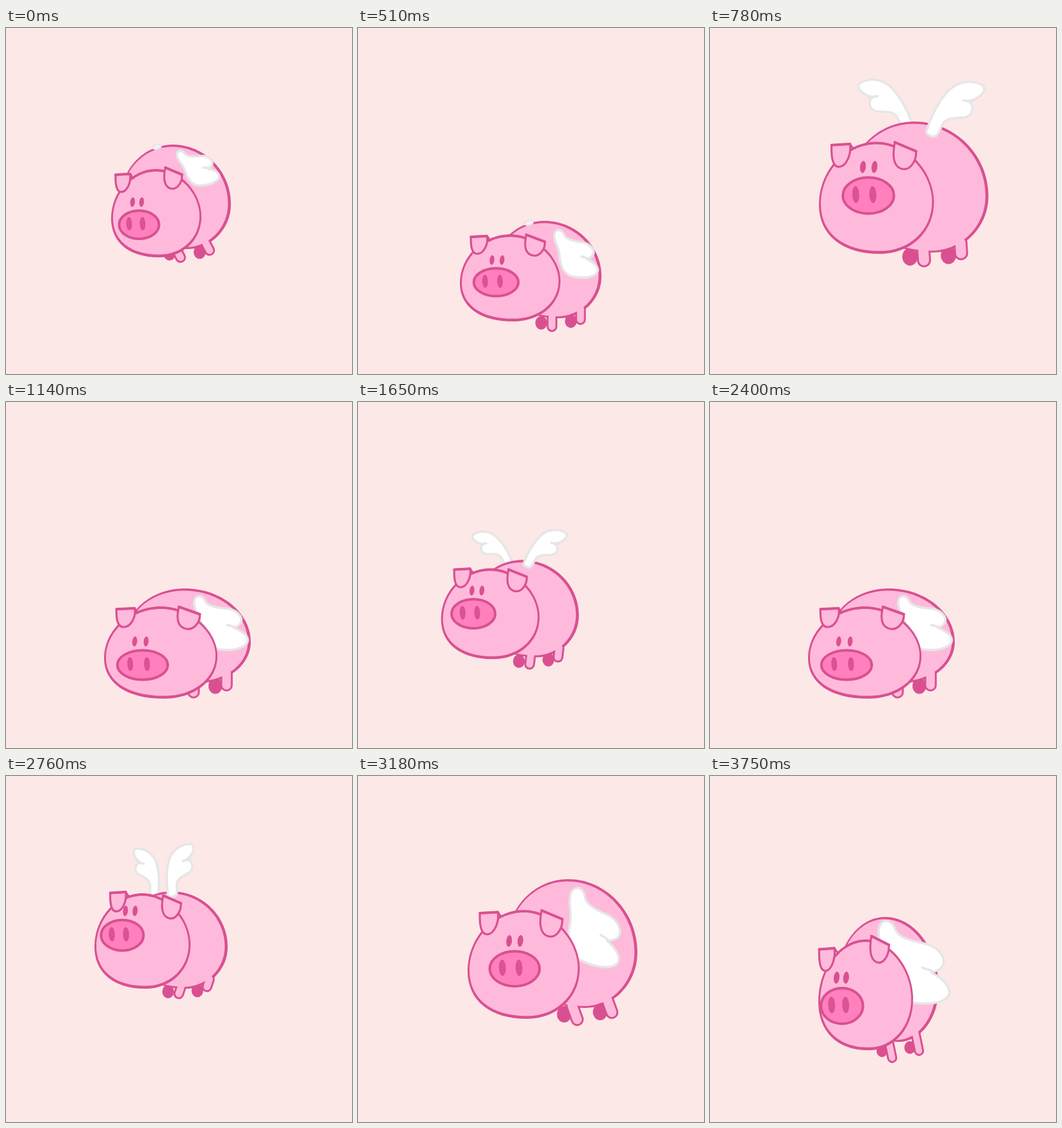
Recreate the animation shown at these times as an HTML page with a canvas. Size 540 by 540 pixels, loop 3780 ms.

```html
<!DOCTYPE html>
<html lang="en">
<head>
<meta charset="utf-8">
<title>Flying pig</title>
<style>
  html, body { margin: 0; width: 100%; height: 100%; overflow: hidden; background: #fce8e6; }
  canvas { display: block; width: 100vw; height: 100vh; }
</style>
</head>
<body>
<canvas id="stage"></canvas>
<script>
const SIZE = 540;
const BG = '#fce8e6', PINK = '#ffbadb', DARK = '#d95091', SNOUT = '#ff80bc', NOSTRIL = '#dc5297', EDGE = '#e6e6e6';

const canvas = document.getElementById('stage');
const ctx = canvas.getContext('2d');
const ratio = window.devicePixelRatio || 1;
canvas.width = canvas.height = Math.round(SIZE * ratio);

// head, body: box sides; face: snout place in the head box, ear slide;
// legs: reach, lean; wing: root along the back, length, angle
const POSES = {
  hop:    { head: [164, 220, 305, 358], face: [.31, .63, -.06], body: [180, 182, 351, 345], legs: [13, 9], wing: [.53, 54, 18] },
  top:    { head: [138, 183, 288, 332], face: [.29, .44, .055], body: [180, 180, 346, 332], legs: [8, -4], wing: [.48, 84, -67] },
  land:   { head: [159, 322, 316, 458], face: [.36, .55, 0], body: [212, 301, 380, 453], legs: [13, 0], wing: [.6, 65, 32] },
  push:   { head: [169, 255, 317, 428], face: [.25, .6, -.1], body: [199, 220, 357, 415], legs: [25, 6], wing: [.48, 110, 35] },
  leap:   { head: [171, 209, 346, 379], face: [.42, .54, 0], body: [232, 161, 436, 362], legs: [18, 8], wing: [.55, 96, 48] },
  peak:   { head: [159, 146, 343, 326], face: [.44, .42, 0], body: [190, 131, 423, 339], legs: [6, -6], wing: [.6, 112, -57] },
  squash: { head: [153, 319, 330, 463], face: [.34, .635, 0], body: [188, 291, 382, 438], legs: [15, 0], wing: [.58, 76, 28] }
};

// Hold time, pose, next pose, blend, sideways drift
const STEPS = [
  [120, 'hop'],
  [120, 'hop', 'top', .55],
  [120, 'top'],
  [30, 'top', 'land', .15, -9],
  [120, 'top', 'land', .55, -20],
  [120, 'land'],
  [30, 'push', 'push', 0, 14],
  [120, 'leap'],
  [120, 'leap', 'peak', .5, 5],
  [120, 'peak'],
  [30, 'peak', 'squash', .15, -9],
  [90, 'peak', 'squash', .55, -5],
  [90, 'squash'],
  [30, 'push']
];
const CYCLE = STEPS.reduce((sum, s) => sum + s[0], 0);

const RAISED = {
  x: 330, y: 150, len: 113, deg: -57,
  body: new Path2D('M321,148C321,125 326,98 334,80C343,58 365,46 387,51C398,56 386,77 370,82C384,83 387,102 373,109C357,115 345,118 343,130C341,138 342,146 338,151C334,154 322,154 321,148Z'),
  notch: new Path2D('M380,79C374,83 368,82 364,83')
};
const FOLDED = {
  x: 301, y: 305, len: 76, deg: 28,
  body: new Path2D('M294,314C294,302 306,300 312,312C316,320 330,322 345,323C358,324 368,333 368,341C368,347 362,351 356,353C366,357 378,364 378,373C377,383 358,390 334,387C316,385 309,370 306,350C304,335 294,326 294,314Z'),
  notch: new Path2D('M358,353C354,349 350,351 346,349')
};
const EAR = new Path2D('M0,0L1,0C.95,.45 .5,1 .1,1C-.25,1 -.2,.55 0,0Z');

const lerp = (a, b, k) => a.map((v, i) => v + (b[i] - v) * k);
const at = ([l, t, r, b], fx, fy) => [l + (r - l) * fx, t + (b - t) * fy];

function blend(a, b, k) {
  const pose = {};
  for (const part in a) pose[part] = lerp(a[part], b[part], k);
  // Wings lead on the way up and lag on the way down
  const rising = b.wing[2] < a.wing[2];
  pose.wing = lerp(a.wing, b.wing, rising ? k ** .25 : k * k);
  return pose;
}

function paint(path, fill, stroke, width) {
  if (fill) { ctx.fillStyle = fill; ctx.fill(path); }
  if (stroke) { ctx.strokeStyle = stroke; ctx.lineWidth = width; ctx.stroke(path); }
}
function ellipse(x, y, rx, ry, tilt = 0) {
  const p = new Path2D();
  p.ellipse(x, y, rx, ry, tilt, 0, 2 * Math.PI);
  return p;
}
function line([x1, y1], [x2, y2], color, width) {
  const p = new Path2D();
  p.moveTo(x1, y1);
  p.lineTo(x2, y2);
  paint(p, null, color, width);
}
function moved(path, matrix) {
  const p = new Path2D();
  p.addPath(path, matrix);
  return p;
}

// Rounded shape touching the box at the given fractions of each side
function egg(box, [left, top, right, bottom], round) {
  const [l, t, r, b] = box;
  const stops = [[l, at(box, 0, left)[1]], [at(box, top, 0)[0], t], [r, at(box, 0, right)[1]], [at(box, bottom, 0)[0], b]];
  const p = new Path2D();
  p.moveTo(...stops[0]);
  stops.forEach(([x, y], i) => {
    const [nx, ny] = stops[(i + 1) % 4], k = round[i];
    const dx = (nx - x) * k, dy = (ny - y) * k;
    if (i % 2) p.bezierCurveTo(x + dx, y, nx, ny - dy, nx, ny);
    else p.bezierCurveTo(x, y + dy, nx - dx, ny, nx, ny);
  });
  return p;
}
// Outline weight differs from side to side
function blob(box, [l, t, r, b], stops, round) {
  paint(egg(box, stops, round), DARK);
  paint(egg([box[0] + l, box[1] + t, box[2] - r, box[3] - b], stops, round), PINK);
}

function wing(kind, [x, y], len, deg, flip = 1) {
  const s = len / kind.len;
  const m = new DOMMatrix().translate(x, y).scale(s * flip, s).rotate(deg - kind.deg).translate(-kind.x, -kind.y);
  paint(moved(kind.body, m), '#fff', EDGE, 3.6);
  paint(moved(kind.notch, m), null, EDGE, 3.6);
}

function farFeet(body, reach) {
  const r = (body[2] - body[0]) * .055;
  for (const [fx, drop] of [[.44, .55], [.715, .35]]) {
    const [x, y] = at(body, fx, 1);
    paint(ellipse(x, y + reach * drop, r, r * 1.15), DARK);
  }
}
function nearLegs(body, [reach, lean], color, thin) {
  const w = (body[2] - body[0]) * .1 - thin;
  for (const [fx, lift] of [[.54, 0], [.805, 11]]) {
    const [x, y] = at(body, fx, 1);
    line([x - lean, y - 4 - lift], [x, y + reach - lift], color, w);
  }
}

function drawFace(head, [turn, nod]) {
  const w = head[2] - head[0], h = head[3] - head[1];
  const [x, y] = at(head, turn, nod);
  const rx = w * .228, ry = h * .167;
  // Eyes slide sideways as the head tips back
  const ex = x - 1 + w * 3.5 * (.45 - turn) * (.6 - nod), ey = y - h * .255;
  for (const s of [-1, 1]) paint(ellipse(ex + s * rx * .22, ey, h * .023, h * .052, .1), DARK, DARK, 1);
  paint(ellipse(x, y, rx - 1, ry - 1), SNOUT, DARK, 4);
  for (const s of [-.48, .17]) paint(ellipse(x + s * rx, y - 1.5, ry * .16, ry * .42, -.04), NOSTRIL, DARK, 1.4);
}

function drawEar(head, fx, fy, [wx, wy], [tx, ty]) {
  const [x, y] = at(head, fx, fy);
  const [cx, cy] = at(head, fx + wx, fy + wy);
  const [px, py] = at(head, fx + tx, fy + ty);
  paint(moved(EAR, new DOMMatrix([cx - x, cy - y, px - x, py - y, x, y])), PINK, DARK, 3.2);
  line([x, y], [cx, cy], DARK, 4);
  return [cx, cy];
}
function drawEars(head, slide) {
  const [x, y] = drawEar(head, .11 + slide, .03 - slide * .6, [.16, -.01], [.05, .195]);
  line([x, y], [x + 5, y + 7], DARK, 3);
  drawEar(head, .66 + slide, .005 + slide * .35, [.185, .08], [.03, .225]);
}

function draw([, from, to = from, k = 0, drift = 0]) {
  const { head, body, face, legs, wing: [root, len, deg] } = blend(POSES[from], POSES[to], k);
  const up = deg < 0, back = .05 + (root - .5) * .5;

  ctx.setTransform(canvas.width / SIZE, 0, 0, canvas.height / SIZE, 0, 0);
  ctx.lineCap = ctx.lineJoin = 'round';
  ctx.fillStyle = BG;
  ctx.fillRect(0, 0, SIZE, SIZE);
  ctx.translate(drift, 0);

  if (up) wing(RAISED, at(body, root - .17, .03), len * .9, deg + 2, -1);
  farFeet(body, legs[0]);
  nearLegs(body, legs, DARK, 0);
  blob(body, [2, 3.6, 4.6, 3], [.5, .47, .57, .6], [.55, .55, .55, .55]);
  nearLegs(body, legs, PINK, 6);

  wing(up ? RAISED : FOLDED, at(body, root, back), len, deg);
  // A short wing lets the far one peek over the back
  if (!up && len < 70) {
    const [x, y] = at(body, .325, .02);
    paint(ellipse(x, y, 6.5, 3.6, -.2), '#f4f4f4', EDGE, 2.6);
  }

  blob(head, [3, 4, 3, 4.4], [.56, .5, .54, .53], [.54, .52, .57, .62]);
  drawFace(head, face);
  drawEars(head, face[2]);
}

let shown = null;
const start = performance.now();
function tick(now) {
  let t = Math.max(0, now - start) % CYCLE;
  const step = STEPS.find(s => (t -= s[0]) < 0);
  if (step !== shown) draw(shown = step);
  requestAnimationFrame(tick);
}
tick(start);
</script>
</body>
</html>
```
